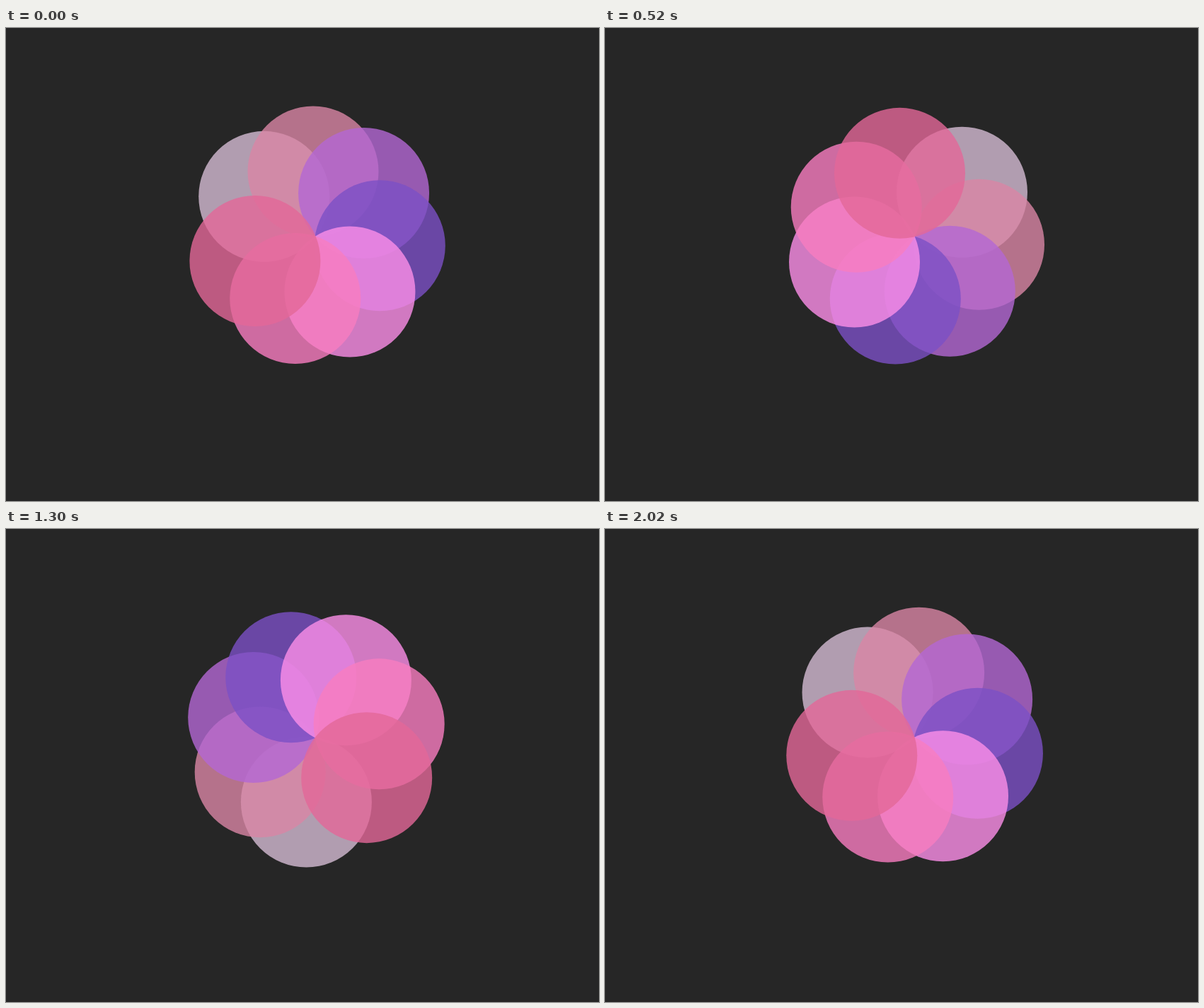
Animation of 838x669 px, one loop 2080 ms. Source, as an HTML page with a canvas:

```html
<!DOCTYPE html>
<html lang="en">
<head>
<meta charset="utf-8">
<title>Petal spinner</title>
<style>
  html, body { margin: 0; width: 100%; height: 100%; overflow: hidden; background: #262626; }
  canvas { display: block; }
</style>
</head>
<body>
<canvas id="stage" width="838" height="669"></canvas>
<script>
const stage = document.getElementById('stage');
const ctx = stage.getContext('2d');
const LOOP = 2080;
const STEP = 78, LEAD = 26;            // ms per step, head start of the first step
const CX = 437.2, CY = 295;
const ORBIT = 92, RADIUS = 92.5;
const START = 218, SPACING = 50;       // degrees
const PETALS = ['#d5bcd4', '#da86a6', '#b568d5', '#7c50c6', '#fd8fe9', '#f97dc1', '#e46899'];

// The ring moves in steps of about 4.7 ticks, 3 degrees per tick.
function turnAt(ms) {
  const step = Math.floor((ms + LEAD) / STEP);
  return 3 * Math.round(4.7 * step + 0.25);
}

function drawPetal(color, degrees) {
  const a = degrees * Math.PI / 180;
  ctx.fillStyle = color;
  ctx.beginPath();
  ctx.arc(CX + ORBIT * Math.cos(a), CY + ORBIT * Math.sin(a), RADIUS, 0, 2 * Math.PI);
  ctx.fill();
}

function tick() {
  const turn = turnAt(performance.now() % LOOP);
  ctx.clearRect(0, 0, stage.width, stage.height);
  ctx.globalAlpha = 0.8;
  PETALS.forEach((color, i) => drawPetal(color, START + SPACING * i + turn));
  requestAnimationFrame(tick);
}
tick();
</script>
</body>
</html>
```
